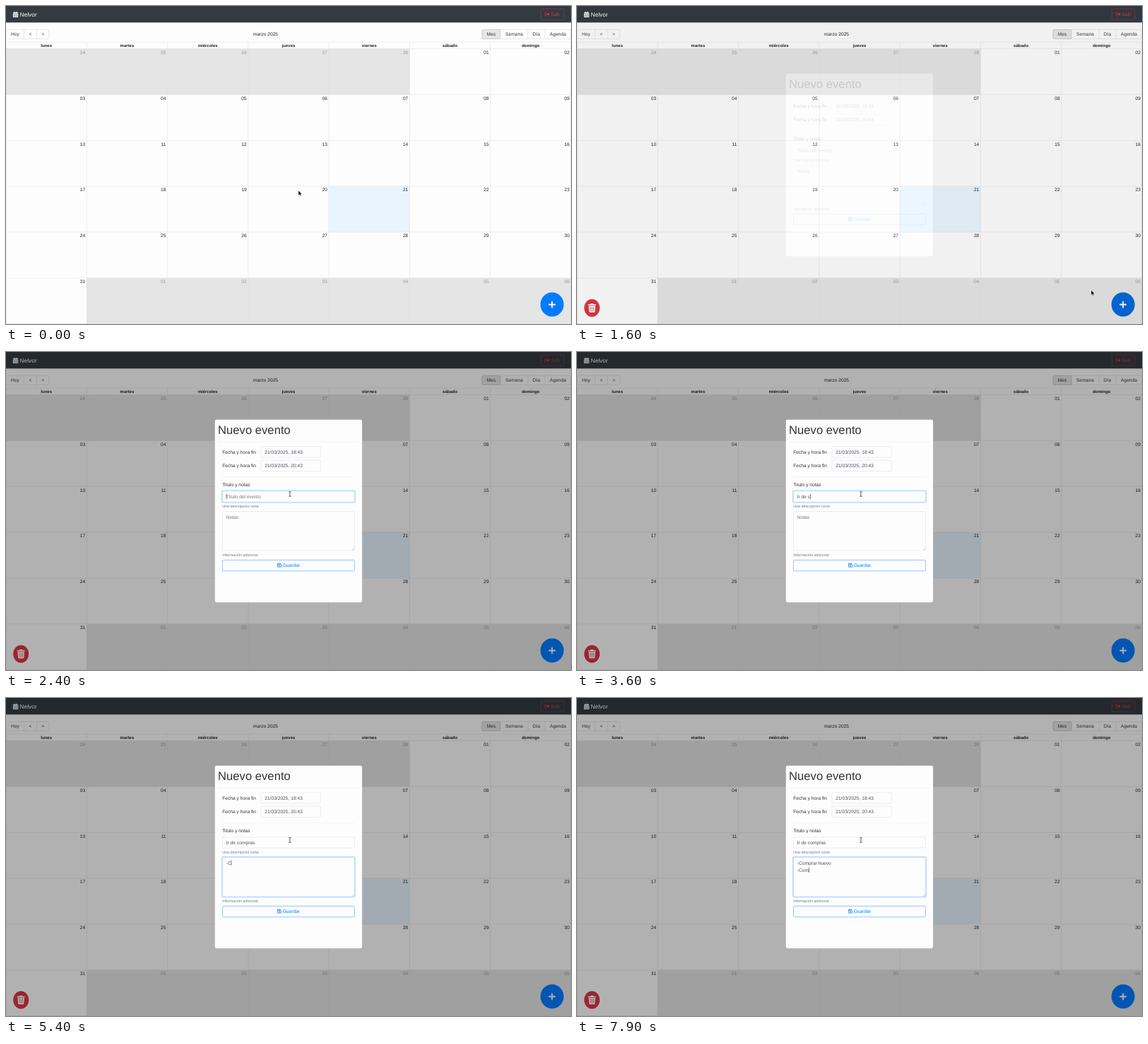
An HTML page that plays this animation: 800x450 px, repeating every 8 s.

```html
<!DOCTYPE html>
<html lang="es">
<head>
<meta charset="utf-8">
<title>Calendario</title>
<style>
  html, body { margin: 0; width: 100%; height: 100%; overflow: hidden; background: #fefdfe; }
  svg { display: block; width: 800px; height: 450px; }
  text { font: 6.667px "Liberation Sans", Arial, sans-serif; white-space: pre; text-rendering: geometricPrecision; }
</style>
</head>
<body>
<svg id="stage" viewBox="0 0 800 450" xmlns="http://www.w3.org/2000/svg"></svg>
<script>
const NS = 'http://www.w3.org/2000/svg';
const LOOP = 8000, TICK = 100;
const PX = 800 / 1920; // one page pixel on the stage

function el(parent, tag, attrs) {
  const node = document.createElementNS(NS, tag);
  for (const key in attrs) node.setAttribute(key, attrs[key]);
  parent.appendChild(node);
  return node;
}
const group = (parent, attrs = {}) => el(parent, 'g', attrs);
const rect = (parent, x, y, width, height, fill, more = {}) =>
  el(parent, 'rect', { x, y, width, height, fill, ...more });
const path = (parent, d, attrs) => el(parent, 'path', { d, ...attrs });
function text(parent, x, y, str, fill, anchor = 'start', style = '') {
  const node = el(parent, 'text', { x, y, fill, 'text-anchor': anchor, style });
  node.textContent = str;
  return node;
}
// Bordered box; the border lies inside the given bounds
const box = (parent, x, y, w, h, stroke, fill = '#fefdfe') =>
  rect(parent, x + PX / 2, y + PX / 2, w - PX, h - PX, fill, { stroke, 'stroke-width': PX, rx: 4 * PX });

const stage = document.getElementById('stage');
rect(stage, 0, 0, 800, 450, '#fefdfe');

// Navigation bar
rect(stage, 0, 0, 800, 23.4, '#343a40');
const calIcon = group(stage, { fill: '#fff' });
path(calIcon, 'M10.6 9h.9V7.8h1.1V9h1.9V7.8h1.1V9h.9q.7 0 .7.7v.8h-7.3v-.8q0-.7.7-.7z');
rect(calIcon, 9.9, 11, 7.3, 5.1, '#fff', { rx: 0.6 });
for (let i = 0; i < 6; i++)
  rect(calIcon, 11 + (i % 3) * 2, 12 + (i / 3 | 0) * 1.9, 1.1, 1.1, '#343a40');
text(stage, 19.6, 14.8, 'Nelvor', '#fff', 'start', 'font-size:8.333px');

box(stage, 757.3, 3.8, 32.9, 15.83, '#dc3545', 'none');
path(stage, 'M765.4 9.3h-1.4q-.8 0-.8.8v3q0 .8.8.8h1.4', { fill: 'none', stroke: '#dc3545', 'stroke-width': 0.8 });
path(stage, 'M765.3 10.8h2.1V9.2l2.5 2.4-2.5 2.4v-1.6h-2.1z', { fill: '#dc3545' });
text(stage, 771.5, 13.9, 'Salir', '#dc3545');

// Toolbar
function buttons(edges, labels, active) {
  const left = edges[0], right = edges[edges.length - 1];
  box(stage, left, 33.3, right - left, 13.4, '#ccc');
  labels.forEach((label, i) => {
    const x = edges[i], w = edges[i + 1] - x;
    if (label === active) box(stage, x, 33.3, w, 13.4, '#adadad', '#e6e6e6');
    else if (i) rect(stage, x - PX / 2, 33.3, PX, 13.4, '#ccc');
    text(stage, x + w / 2, 42.2, label, '#373a3c', 'middle');
  });
}
buttons([0, 25.6, 43.4, 61], ['Hoy', '<', '>']);
buttons([673.9, 700, 739, 763, 800], ['Mes', 'Semana', 'Día', 'Agenda'], 'Mes');
text(stage, 367.5, 42.2, 'marzo 2025', '#212529', 'middle');

// Month grid
const COL = 800 / 7, TOP = 60.5, ROW = 64.88;
const days = ['lunes', 'martes', 'miércoles', 'jueves', 'viernes', 'sábado', 'domingo'];
for (let i = 0; i < 42; i++) {
  const day = i - 4; // 1 = first of March
  const off = day < 1 || day > 31;
  const x = (i % 7) * COL, y = TOP + (i / 7 | 0) * ROW;
  if (off || day === 21) rect(stage, x, y, COL, ROW, off ? '#e5e5e5' : '#e8f5fe');
  const n = day < 1 ? day + 28 : day > 31 ? day - 31 : day;
  text(stage, x + COL - 2.1, y + 7.3, String(n).padStart(2, '0'), off ? '#999' : '#212529', 'end');
}
days.forEach((name, i) =>
  text(stage, (i + 0.5) * COL, 57.8, name, '#212529', 'middle', 'font-size:6px;font-weight:bold'));
const lines = group(stage, { stroke: '#d8d8d8', 'stroke-width': PX, fill: 'none' });
rect(lines, 0.2, 51, 799.6, 398.7, 'none');
for (let i = 0; i < 6; i++) path(lines, `M0 ${TOP + i * ROW}H800`);
for (let i = 1; i < 7; i++) path(lines, `M${i * COL} 51V449.7`);

// Round buttons
const fab = el(stage, 'ellipse', { cx: 773.2, cy: 422.4, rx: 16.5, ry: 17.1 });
path(stage, 'M773.2 418.4v8.2M769.1 422.5h8.2', { stroke: '#fff', 'stroke-width': 1.9, 'stroke-linecap': 'round' });
const trash = group(stage);
el(trash, 'ellipse', { cx: 21.2, cy: 427.3, rx: 11, ry: 12.5, fill: '#dc3545' });
path(trash, 'M15.7 422h3.2l.6-.9h3.4l.6.9h3.2v1.5h-11zM16.5 424.2h9.5l-.6 8.2q-.1 1-1.1 1h-6.1q-1 0-1.1-1z', { fill: '#fff' });
path(trash, 'M19 425.6v6.2M21.25 425.6v6.2M23.5 425.6v6.2', { stroke: '#dc3545', 'stroke-width': 0.7 });

// Modal
const LEFT = 306.25, WIDTH = 187.5, CONTROL = 38 * PX;
const overlay = group(stage);
rect(overlay, 0, 0, 800, 450, '#000', { 'fill-opacity': 0.3 });
rect(overlay, 295.83, 95.83, 208.33, 258.33, '#fefdfe', { rx: 5 * PX });
text(overlay, 300, 116.1, 'Nuevo evento', '#333', 'start', 'font-size:16.667px');
path(overlay, 'M300 127H500M306.25 176.8H493.75', { stroke: '#e4e4e4', 'stroke-width': PX });
['18:43', '20:43'].forEach((hour, i) => {
  const y = 133.5 + i * 19.5;
  text(overlay, LEFT, y + 10.3, 'Fecha y hora fin', '#333');
  box(overlay, 360.8, y, 85.1, CONTROL, '#ced4da');
  text(overlay, 366.2, y + 10.3, '21/03/2025, ' + hour, '#495057');
});
text(overlay, LEFT, 190.4, 'Titulo y notas', '#333');
text(overlay, LEFT, 220.1, 'Una descripción corta', '#6c757d', 'start', 'font-size:5.333px');
text(overlay, LEFT, 288.9, 'Información adicional', '#6c757d', 'start', 'font-size:5.333px');

function field(y, h, baseline, hint) {
  const spread = 3.2 * PX;
  const glow = rect(overlay, LEFT - spread / 2, y - spread / 2, WIDTH + spread, h + spread, 'none',
    { stroke: '#007bff', 'stroke-opacity': 0.25, 'stroke-width': spread, rx: 2.3 });
  const frame = box(overlay, LEFT, y, WIDTH, h, '#ced4da');
  const rows = [0, 1].map(i => text(overlay, 311.7, baseline + i * 10, '', '#495057'));
  const caret = rect(overlay, 0, 0, 0.6, 7.4, '#333');
  return (value, focused, blinkOn) => {
    const parts = value.split('\n');
    rows.forEach((row, i) => row.textContent = parts[i] || '');
    rows[0].setAttribute('fill', value ? '#495057' : '#6c757d');
    const last = parts.length - 1;
    const width = parts[last] ? rows[last].getComputedTextLength() : 0;
    if (!value) rows[0].textContent = hint;
    caret.setAttribute('x', 311.7 + width);
    caret.setAttribute('y', baseline - 5.9 + last * 10);
    caret.style.display = focused && blinkOn ? '' : 'none';
    glow.style.display = focused ? '' : 'none';
    frame.setAttribute('stroke', focused ? '#80bdff' : '#ced4da');
  };
}
const drawTitle = field(196.6, CONTROL, 206.7, 'Título del evento');
const drawNotes = field(225.4, 134 * PX, 235.5, 'Notas');
path(overlay, 'M490.2 280.4l2.8-2.8M491.8 280.4l1.2-1.2', { stroke: '#888', 'stroke-width': 0.4 });
box(overlay, LEFT, 294.2, WIDTH, CONTROL, '#007bff');
const save = group(overlay, { fill: 'none', stroke: '#007bff', 'stroke-width': 0.75 });
path(save, 'M384.6 299.3h3.7l1.3 1.3v3.6h-5zM385.7 299.3v1.7h2.4v-1.7');
el(save, 'circle', { cx: 387.1, cy: 302.6, r: 0.6 });
text(overlay, 391.7, 304.3, 'Guardar', '#007bff');

// Pointers
const arrow = path(stage, 'M0 0V7.2L1.6 5.7L2.7 8.3L3.9 7.8L2.8 5.3H5z',
  { fill: '#000', stroke: '#fff', 'stroke-width': 0.5 });
const beam = path(stage, 'M-1.5 -3.5Q0 -3.5 0 -2.7Q0 -3.5 1.5 -3.5M0 -2.7V2.7M-1.5 3.5Q0 3.5 0 2.7Q0 3.5 1.5 3.5',
  { fill: 'none', stroke: '#222', 'stroke-width': 0.75 });

const OPEN = 1550, FOCUS_TITLE = 2200, FOCUS_NOTES = 4200;
const route = [[700, 414, 261], [1300, 769, 420], [1500, 769, 420], [1600, 728, 402], [1700, 469, 273], [2100, 402, 201]];
const titleKeys = { str: 'Ir de compras',
  at: [2800, 2900, 3000, 3200, 3300, 3400, 3600, 3700, 3700, 3800, 3900, 3900, 4000] };
const notesKeys = { str: '-Comprar huevo\n-Com',
  at: [5200, 5400, 5600, 5700, 5800, 5900, 6000, 6200, 6300, 6300, 6400, 6400, 6500, 6600, 7200, 7600, 7700, 7800, 7900] };

const clamp = v => Math.max(0, Math.min(1, v));
const smooth = v => v * v * (3 - 2 * v);

function pointer(t) {
  let i = 0;
  while (i < route.length - 2 && t >= route[i + 1][0]) i++;
  const [t0, x0, y0] = route[i], [t1, x1, y1] = route[i + 1];
  const k = smooth(clamp((t - t0) / (t1 - t0)));
  return [x0 + (x1 - x0) * k, y0 + (y1 - y0) * k];
}
function typed(keys, t) {
  return keys.str.slice(0, keys.at.filter(at => at <= t).length);
}
function blink(keys, start, t) {
  const last = Math.max(start, ...keys.at.filter(at => at <= t));
  return (t - last) % 1000 < 500;
}

function draw(t) {
  const [x, y] = pointer(t);
  const overForm = t >= 1800;
  arrow.style.display = overForm ? 'none' : '';
  beam.style.display = overForm ? '' : 'none';
  (overForm ? beam : arrow).setAttribute('transform', `translate(${x} ${y})`);

  const opened = t >= OPEN;
  fab.setAttribute('fill', t >= 1300 && t < 1700 ? '#0069d9' : '#007bff');
  trash.style.display = opened ? '' : 'none';
  overlay.style.display = opened ? '' : 'none';
  overlay.setAttribute('opacity', smooth(clamp((t - OPEN) / 200)));

  drawTitle(typed(titleKeys, t), t >= FOCUS_TITLE && t < FOCUS_NOTES, blink(titleKeys, FOCUS_TITLE, t));
  drawNotes(typed(notesKeys, t), t >= FOCUS_NOTES, blink(notesKeys, FOCUS_NOTES, t));
}

const start = performance.now();
let shown = -1;
function frame() {
  const t = Math.floor(((performance.now() - start) % LOOP) / TICK) * TICK;
  if (t !== shown) draw(shown = t);
  requestAnimationFrame(frame);
}
frame();
</script>
</body>
</html>
```
